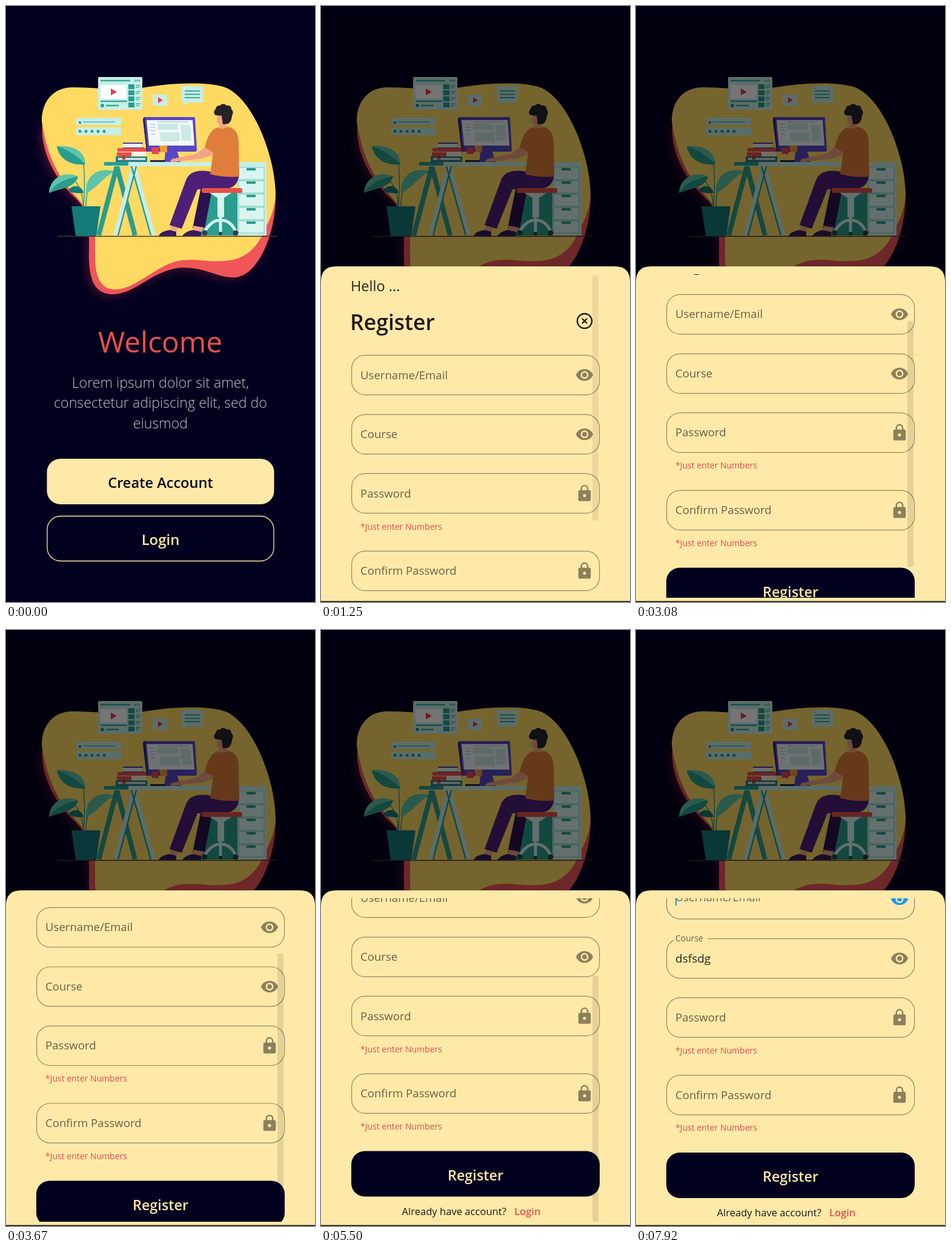
These frames come from a looping animation (510x982 px, 8 s). An HTML page:

```html
<!DOCTYPE html>
<html lang="en">
<head>
<meta charset="utf-8">
<title>Welcome and register</title>
<style>
  html, body { margin: 0; width: 100%; height: 100%; overflow: hidden; background: #02001f; }
  svg { display: block; width: 100vw; height: 100vh; font-family: "Open Sans", "Noto Sans", sans-serif; }
  .mid { text-anchor: middle; }
  .semi { font-weight: 600; }
  .label { font-size: 18.6px; fill: #6a6146; }
  .hint { font-size: 14px; fill: #e54d4b; }
  .icon { fill: #8c805c; fill-rule: evenodd; }
  .box { fill: none; stroke: #94885f; stroke-width: 1.2; }
</style>
</head>
<body>
<svg viewBox="0 0 510 982">
  <defs>
    <clipPath id="view"><rect y="442" width="510" height="533"/></clipPath>
    <clipPath id="btn"><rect x="67.500" y="746" width="375" height="75" rx="22"/></clipPath>
    <filter id="blur" x="-20%" y="-20%" width="140%" height="140%"><feGaussianBlur stdDeviation="8"/></filter>
    <path id="redBlob" d="M60 195C56 245 88 292 112 314C140 338 137 370 137 402C136 444 142 474 175 475C215 475 240 435 290 431C330 430 350 449 380 447C420 441 446 369 445 310L300 200Z"/>
    <path id="eye" d="M12 4.5C7 4.5 2.73 7.61 1 12c1.73 4.39 6 7.5 11 7.5s9.27-3.11 11-7.5c-1.73-4.39-6-7.5-11-7.5zM12 17a5 5 0 1 1 0-10 5 5 0 0 1 0 10zM12 9a3 3 0 1 0 0 6 3 3 0 0 0 0-6z"/>
    <path id="lock" d="M18 8h-1V6A5 5 0 0 0 7 6v2H6a2 2 0 0 0-2 2v10a2 2 0 0 0 2 2h12a2 2 0 0 0 2-2V10a2 2 0 0 0-2-2zM12 17a2 2 0 1 1 0-4 2 2 0 0 1 0 4zM15.1 8H8.9V6a3.1 3.1 0 0 1 6.2 0z"/>
  </defs>

  <rect width="510" height="982" fill="#02001f"/>

  <!-- illustration -->
  <use href="#redBlob" x="-4" y="4" fill="#c03048" opacity=".35" filter="url(#blur)"/>
  <use href="#redBlob" fill="#f05558"/>
  <path fill="#ffda62" d="M59 190C59 155 80 133 112 134C150 134 190 141 230 134C270 127 343 123 368 137C412 162 444 250 445 310C444 330 438 347 430 362C415 400 395 418 360 420C330 422 318 416 290 419C250 424 215 467 180 467C155 467 147 445 147 410C147 375 150 355 128 328C105 300 72 275 59 190Z"/>

  <g id="cards">
    <rect x="152" y="117" width="73" height="54" rx="2" fill="#c8eee6"/>
    <path d="M156 123H205M156 157H200M165 164H186" stroke="#3aa99b" stroke-width="2.4"/>
    <path d="M212 123H221" stroke="#3aa99b" stroke-width="3" stroke-dasharray="2 1.5"/>
    <rect x="156" y="130" width="43" height="23" fill="#fff"/>
    <path d="M173 136L183 141.5L173 147Z" fill="#e23a52"/>
    <circle cx="159" cy="164" r="3" fill="#2a9d8f"/>
    <path d="M242 146H266V164H262L257 168V164H242ZM290 132H325V159H300L294 163V159H290ZM116 184H190V196H116ZM116 200H190V213H116Z" fill="#c8eee6"/>
    <path d="M251 150.500L259 155L251 160Z" fill="#e23a52"/>
    <path d="M295 140H320M295 145.500H320M295 151H320" stroke="#3aa99b" stroke-width="2"/>
    <path d="M127 191H180" stroke="#4fb5a7" stroke-width="1.3"/>
    <path d="M120 190h4v4h-4z" fill="#2a9d8f"/>
    <path d="M122 206.500H164" stroke="#2a9d8f" stroke-width="5" stroke-linecap="round" stroke-dasharray="0 10"/>
  </g>

  <!-- plant -->
  <path d="M128 330C130 300 131 270 126 252M128 330C126 310 122 295 110 284M132 330C132 300 140 285 160 275" fill="none" stroke="#2a9d8f" stroke-width="1.5"/>
  <path fill="#5cc5ab" d="M84 231C112 229 131 240 131 261C106 263 88 252 84 231ZM71 308C72 284 96 270 119 281C113 300 93 299 71 308ZM132 309C130 281 151 263 181 273C163 278 158 294 132 309Z"/>
  <path fill="#2a9d8f" d="M84 231C101 236 118 247 131 261C106 263 88 252 84 231ZM71 308C82 291 101 284 119 281C113 300 93 299 71 308Z"/>
  <path fill="#157a7a" d="M103 305C106 295 124 292 128 308C118 309 110 308 103 305ZM108 330H156L149 379H115Z"/>

  <!-- desk and drawers -->
  <path d="M336 300H384V378H320Z" fill="#2a9d8f"/>
  <path d="M153 378L183 264L213 378" fill="none" stroke="#2a9d8f" stroke-width="8"/>
  <path d="M181 378L211 264L243 378" fill="none" stroke="#c8eee6" stroke-width="8"/>
  <path d="M215 264L185 378M207 264L239 378" stroke="#2a9d8f" stroke-width="2.500"/>
  <rect x="382" y="262" width="48" height="116" fill="#c8eee6"/>
  <g id="drawers"></g>
  <rect x="162" y="257" width="268" height="7" fill="#c8eee6"/>
  <rect x="162" y="257" width="40" height="6" fill="#2a9d8f"/>

  <!-- books -->
  <rect x="193" y="226" width="31" height="8" fill="#e8f4f2"/>
  <path d="M193 226H226M193 234H228" stroke="#4a3f9f" stroke-width="2"/>
  <rect x="184" y="234" width="49" height="6" fill="#e5524b"/>
  <rect x="188" y="240" width="43" height="7" fill="#f4f1e6"/>
  <rect x="183" y="241" width="24" height="8" fill="#e5524b"/>
  <rect x="181" y="248" width="52" height="9" fill="#2a7f86"/>
  <path d="M185 252H230" stroke="#e8f4f2" stroke-width="3"/>
  <path d="M192 246h5v8l-2.500-2-2.500 2z" fill="#c9303d"/>

  <!-- computer -->
  <path d="M263 238H282L288 257H250L262 253Z" fill="#5846c4"/>
  <path d="M229 183H310Q312 183 312 186L315 237Q315 240 312 240H235Q232 240 232 237L226 187Q226 183 229 183Z" fill="#5846c4"/>
  <path d="M229 183L226 187L232 239L234 240Z" fill="#2a2468"/>
  <path d="M232 188H308L311 230H236Z" fill="#f2f8fa"/>
  <path d="M250 194H283L284 204H251ZM254 208H286L287 223H255ZM288 196H304L306 222H290Z" fill="#cbe9e6"/>
  <path d="M237 195H246M238 200H247M238 205H247M239 211H246M250 191H300" stroke="#b8cfda" stroke-width="1.3"/>
  <path d="M240 233H252V244H241Z" fill="#e5484d"/>
  <path d="M253 230H266V241H255Z" fill="#f29a38"/>
  <path d="M238 255.500H262" stroke="#22203a" stroke-width="3"/>

  <!-- person on the stool -->
  <path fill="#2c124f" d="M322 298H341L328 366H308Z"/>
  <path fill="#f2a585" d="M309 362L327 365L322 373L309 372ZM273 360L285 363L281 373L271 371Z"/>
  <path fill="#4d1f78" d="M338 273Q305 267 297 287L270 361L290 367L316 302Q345 302 366 301Q384 296 384 279Z"/>
  <path fill="#3a1a5e" d="M252 379Q254 372 270 369L281 372V379ZM291 379Q295 372 308 369L322 372V379Z"/>
  <path d="M336 308H372L360 316V348H349V316Z" fill="#d6f3ee"/>
  <path d="M328 371Q340 352 354 353Q370 352 379 371M354 346V373" fill="none" stroke="#d6f3ee" stroke-width="5"/>
  <g fill="#24434a"><circle cx="328" cy="374" r="4.500"/><circle cx="379" cy="374" r="4.500"/><circle cx="354" cy="375" r="3"/></g>
  <rect x="323" y="300" width="67" height="8" rx="3" fill="#e5524b"/>
  <path fill="#f2a585" d="M349 180H364V199L360 206L350 203L352 194L348 193ZM331 231L349 240Q335 250 318 252L276 257Q268 257 274 252L313 244Z"/>
  <path fill="#e07d3a" d="M349 200Q355 205 366 199Q384 202 384 226L385 281Q360 283 337 277L342 241L328 233Q335 204 349 200Z"/>
  <path fill="#26222b" d="M346 180a6 6 0 0 1 0-10a6 6 0 0 1 7-6a7 7 0 0 1 11 0a6 6 0 0 1 8 6a7 7 0 0 1 1 10Q373 189 367 194L358 195L356 181Q350 180 346 180Z"/>

  <path d="M85 379.500H447" stroke="#46392d" stroke-width="1.5"/>

  <!-- welcome copy -->
  <text class="mid" x="254.500" y="570.500" font-size="47.800" fill="#e9504e">Welcome</text>
  <g class="mid" font-size="23.2" font-weight="300" fill="#c2c1d0">
    <text x="255" y="629">Lorem ipsum dolor sit amet,</text>
    <text x="255" y="662">consectetur adipiscing elit, sed do</text>
    <text x="255" y="696">eiusmod</text>
  </g>
  <rect x="67.500" y="746" width="375" height="75" rx="22" fill="#ffe9a8"/>
  <g clip-path="url(#btn)"><circle id="splash" cx="255" cy="784" fill="#000"/></g>
  <text class="mid semi" x="255" y="794" font-size="23.600" fill="#0a0718">Create Account</text>
  <rect x="68" y="840.500" width="374" height="74" rx="22" fill="none" stroke="#ffe9a8" stroke-width="1.300"/>
  <text class="mid semi" x="255" y="888" font-size="23.900" fill="#ffe9a8">Login</text>

  <rect id="scrim" width="510" height="982" fill="#000"/>

  <!-- register sheet -->
  <g id="sheet">
    <path d="M0 982V454Q0 429 25 429H485Q510 429 510 454V982Z" fill="#ffe9a8"/>
    <g clip-path="url(#view)">
      <g id="form">
        <text x="49" y="470" font-size="23.500" fill="#2a231c">Hello ...</text>
        <text class="semi" x="48" y="534" font-size="35.500" fill="#21191a">Register</text>
        <path d="M431 515l8 8m0-8l-8 8M447 519a12 12 0 1 1-24 0a12 12 0 1 1 24 0" fill="none" stroke="#21191a" stroke-width="2.400"/>
        <g id="fields"></g>
        <text class="hint" x="65" y="862.500">*Just enter Numbers</text>
        <text class="hint" x="65" y="990">*Just enter Numbers</text>
        <rect x="50" y="1025.500" width="410" height="75" rx="22" fill="#02001f"/>
        <text class="mid semi" x="255" y="1074" font-size="23.400" fill="#ffe9a8">Register</text>
        <text x="133.500" y="1131" font-size="16.600" fill="#1c1718">Already have account?</text>
        <text class="semi" x="319" y="1131" font-size="16.600" fill="#e54d4b">Login</text>
      </g>
      <rect id="bar" x="448" width="10" height="405" rx="3" fill="#000"/>
    </g>
  </g>
  <rect id="edge" y="980.500" width="510" height="1.500" fill="#0a0a0c"/>
</svg>

<script>
const LOOP = 8000, STEP = 1000 / 12;
const $ = id => document.getElementById(id);
const set = (el, attrs) => { for (const k in attrs) el.setAttribute(k, attrs[k]); return el; };
const add = (parent, tag, attrs, text = '') => {
  const el = set(document.createElementNS('http://www.w3.org/2000/svg', tag), attrs);
  el.textContent = text;
  parent.appendChild(el);
  return el;
};

for (let i = 0; i < 4; i++) {
  add($('cards'), 'rect', { x: 202, y: 129 + i * 10, width: 10, height: 8, fill: '#2a9d8f' });
  add($('cards'), 'path', { d: `M214 ${131 + i * 10}h8m-8 3h6`, stroke: '#4fb5a7', 'stroke-width': 1.4 });
}
for (let i = 0; i < 5; i++) {
  const y = 266 + i * 22;
  add($('drawers'), 'rect', { x: 384, y, width: 42, height: 20, fill: '#d9f5f0', stroke: '#7cc9be' });
  add($('drawers'), 'rect', { x: 397, y: y + 1, width: 15, height: 4, fill: '#2a9d8f' });
}

const makeField = (y, name, icon) => {
  const g = add($('fields'), 'g', { transform: `translate(0 ${y})` });
  return {
    box: add(g, 'rect', { class: 'box', x: 50.6, y: -32.6, width: 409, height: 65.2, rx: 22 }),
    gap: add(g, 'rect', { x: 61, y: -35, width: 57, height: 5, fill: '#ffe9a8', opacity: 0 }),
    label: add(g, 'text', { class: 'label' }, name),
    value: add(g, 'text', { x: 65, y: 6.5, 'font-size': 19, fill: '#2a231c' }),
    caret: add(g, 'rect', { y: -10.5, width: 2, height: 21, fill: '#2196f3' }),
    icon: add(g, 'use', { class: 'icon', href: '#' + icon, transform: 'translate(419.600 -15.400) scale(1.28)' })
  };
};
const fields = [
  makeField(608, 'Username/Email', 'eye'),
  makeField(705.7, 'Course', 'eye'),
  makeField(803, 'Password', 'lock'),
  makeField(930.7, 'Confirm Password', 'lock')
];

// [time, value] tables
const SCROLL = [[2583, 0], [2750, 20], [2917, 64], [3083, 100], [3333, 114], [3700, 118.5],
  [4670, 118.5], [4833, 132], [5083, 157], [5300, 167], [7833, 167], [7917, 164.5]];
const BAR = [[1100, 0], [1300, 1], [1850, 1], [2150, 0], [2580, 0], [2700, 1], [4300, 1],
  [4600, 0], [4650, 0], [4800, 1], [5900, 1], [6200, 0]];
const KEYS = [6490, 6825, 6910, 7080, 7160, 7330];
const TYPED = 'dsfsdg';

const ramp = (t, a, b) => Math.min(1, Math.max(0, (t - a) / (b - a)));
const smooth = x => x * x * (3 - 2 * x);
const track = (rows, t) => {
  let v = rows[0][1];
  for (let i = 1; i < rows.length; i++) {
    v += (rows[i][1] - rows[i - 1][1]) * ramp(t, rows[i - 1][0], rows[i][0]);
  }
  return v;
};
// cubic-bezier(0, 0, .2, 1)
const decelerate = x => {
  let lo = 0, hi = 1;
  for (let i = 0; i < 20; i++) {
    const s = (lo + hi) / 2;
    if (.6 * s * s + .4 * s * s * s < x) lo = s; else hi = s;
  }
  return smooth((lo + hi) / 2);
};
const mix = (a, b, p) => `rgb(${a.map((v, i) => Math.round(v + (b[i] - v) * p))})`;
const BLUE = [33, 150, 243];

// lift: label position 0..1, glow: focus colour 0..1
function drawField(f, lift, glow, focused, text = '', caretOn = true) {
  const k = 1 - .25 * lift;
  set(f.label, { transform: `translate(65 ${6.5 - 35 * lift}) scale(${k})` });
  f.label.style.fill = mix([106, 97, 70], BLUE, glow);
  f.box.style.stroke = mix([148, 136, 95], BLUE, glow);
  f.box.style.strokeWidth = 1.2 + .8 * glow;
  set(f.gap, { opacity: ramp(lift, .4, .8) });
  f.icon.style.fill = focused ? '#2196f3' : '#8c805c';
  if (f.value.textContent !== text) f.value.textContent = text;
  const end = text ? f.value.getComputedTextLength() + 1 : 0;
  set(f.caret, { x: 65 + end, opacity: focused && caretOn ? 1 : 0 });
}

function draw(t) {
  const press = ramp(t, 640, 950);
  set($('splash'), { r: 20 + 190 * press, opacity: press > 0 ? .09 * (1 - press * .6) : 0 });

  const open = ramp(t, 957.5, 1207.5);
  set($('scrim'), { opacity: .54 * smooth(ramp(open, -.1, 1)) * (open > 0) });
  set($('sheet'), { transform: `translate(0 ${553 * (1 - decelerate(open))})` });
  set($('edge'), { opacity: open > 0 ? 1 : 0 });

  const y = track(SCROLL, t);
  set($('form'), { transform: `translate(0 ${-y})` });
  set($('bar'), { y: 443 + y * .76, opacity: .1 * track(BAR, t) });

  const tap = smooth(ramp(t, 7880, 8080));
  drawField(fields[0], tap, tap, t > 7880);

  const count = KEYS.filter(k => t >= k).length;
  const since = t - (count ? KEYS[count - 1] : 6080);
  const lift = smooth(ramp(t, 6080, 6250));
  const glow = lift * (1 - ramp(t, 7420, 7580));
  drawField(fields[1], lift, glow, t >= 6080 && t < 7490, TYPED.slice(0, count), since % 1000 < 500);

  for (const f of fields.slice(2)) drawField(f, 0, 0, false);
}

const start = performance.now();
function tick() {
  const t = (performance.now() - start) % LOOP;
  draw(Math.min(95, Math.floor((t + 4) / STEP)) * STEP);
  requestAnimationFrame(tick);
}
tick();
</script>
</body>
</html>
```
